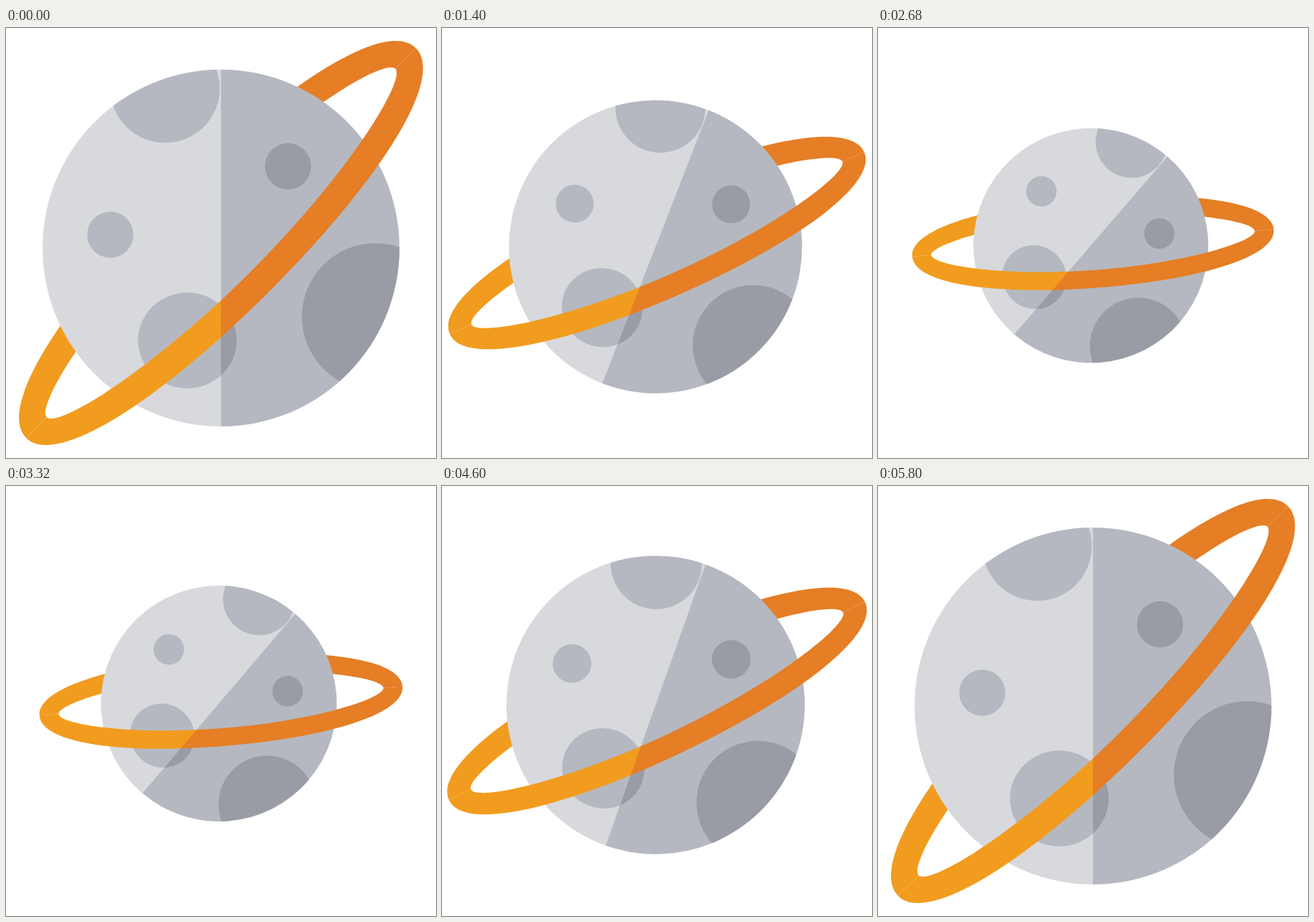
An HTML page that plays this animation: 600x600 px, repeating every 5840 ms.

```html
<!DOCTYPE html>
<html lang="en">
<head>
<meta charset="utf-8">
<title>Ringed planet</title>
<style>
  html, body { margin: 0; height: 100%; overflow: hidden; background: #fff; }
  svg { display: block; width: 100%; height: 100%; }
</style>
</head>
<body>
<svg viewBox="-300 -300 600 600">
  <defs>
    <!-- Each gradient is a one-pixel step between the lit and the shaded side. -->
    <linearGradient id="ground" gradientUnits="userSpaceOnUse" x1="-.6" x2=".6">
      <stop stop-color="#d8d9dd"/><stop offset="1" stop-color="#b5b8c0"/>
    </linearGradient>
    <linearGradient id="crater" gradientUnits="userSpaceOnUse" x1="-.6" x2=".6">
      <stop stop-color="#b5b8c0"/><stop offset="1" stop-color="#9a9ca5"/>
    </linearGradient>
    <linearGradient id="band" gradientUnits="userSpaceOnUse" x1="-.4" y1="-.4" x2=".4" y2=".4">
      <stop stop-color="#f19c1f"/><stop offset="1" stop-color="#e57e25"/>
    </linearGradient>
    <clipPath id="disc"><circle cy="7" r="249"/></clipPath>
    <path id="half" d="M-384.5 0C-384.5 60 -212 95.4 0 95.4S384.5 60 384.5 0H344C344 21.5 197 57.5 0 57.5S-344 21.5 -344 0Z"/>
  </defs>
  <g id="planet">
    <g transform="rotate(-45)" fill="url(#band)">
      <use href="#half" transform="scale(1 -1)" fill="url(#band)" id="back"/>
    </g>
    <circle cy="7" r="249" fill="url(#ground)"/>
    <g fill="url(#crater)" clip-path="url(#disc)">
      <circle cx="-78" cy="-216" r="76.3"/>
      <circle cx="215.5" cy="103" r="102.7"/>
      <circle cx="-154.5" cy="-11.5" r="32.3"/>
      <circle cx="93.5" cy="-107" r="32.3"/>
      <ellipse cx="-47" cy="136" rx="68.8" ry="66.8"/>
    </g>
    <use href="#half" transform="rotate(-45)" fill="url(#band)"/>
  </g>
</svg>
<script>
  const LOOP = 5840, STEP = 40, TURN = 3000, END = 5800;
  const MAX_ANGLE = 45.6, SHRINK = 0.383;
  const planet = document.getElementById('planet');

  // The back half is mirrored, so its colour split needs the mirrored direction.
  const backBand = document.getElementById('band').cloneNode(true);
  backBand.id = 'backBand';
  backBand.setAttribute('y1', '.4');
  backBand.setAttribute('y2', '-.4');
  document.querySelector('defs').append(backBand);
  document.getElementById('back').setAttribute('fill', 'url(#backBand)');

  function draw(now) {
    const t = Math.floor(now % LOOP / STEP) * STEP;
    const p = t < TURN ? t / TURN : (END - t) / (END - TURN);
    planet.setAttribute('transform', `rotate(${MAX_ANGLE * p}) scale(${1 - SHRINK * p})`);
  }

  const start = performance.now();
  function tick() {
    draw(performance.now() - start);
    requestAnimationFrame(tick);
  }
  tick();
</script>
</body>
</html>
```
